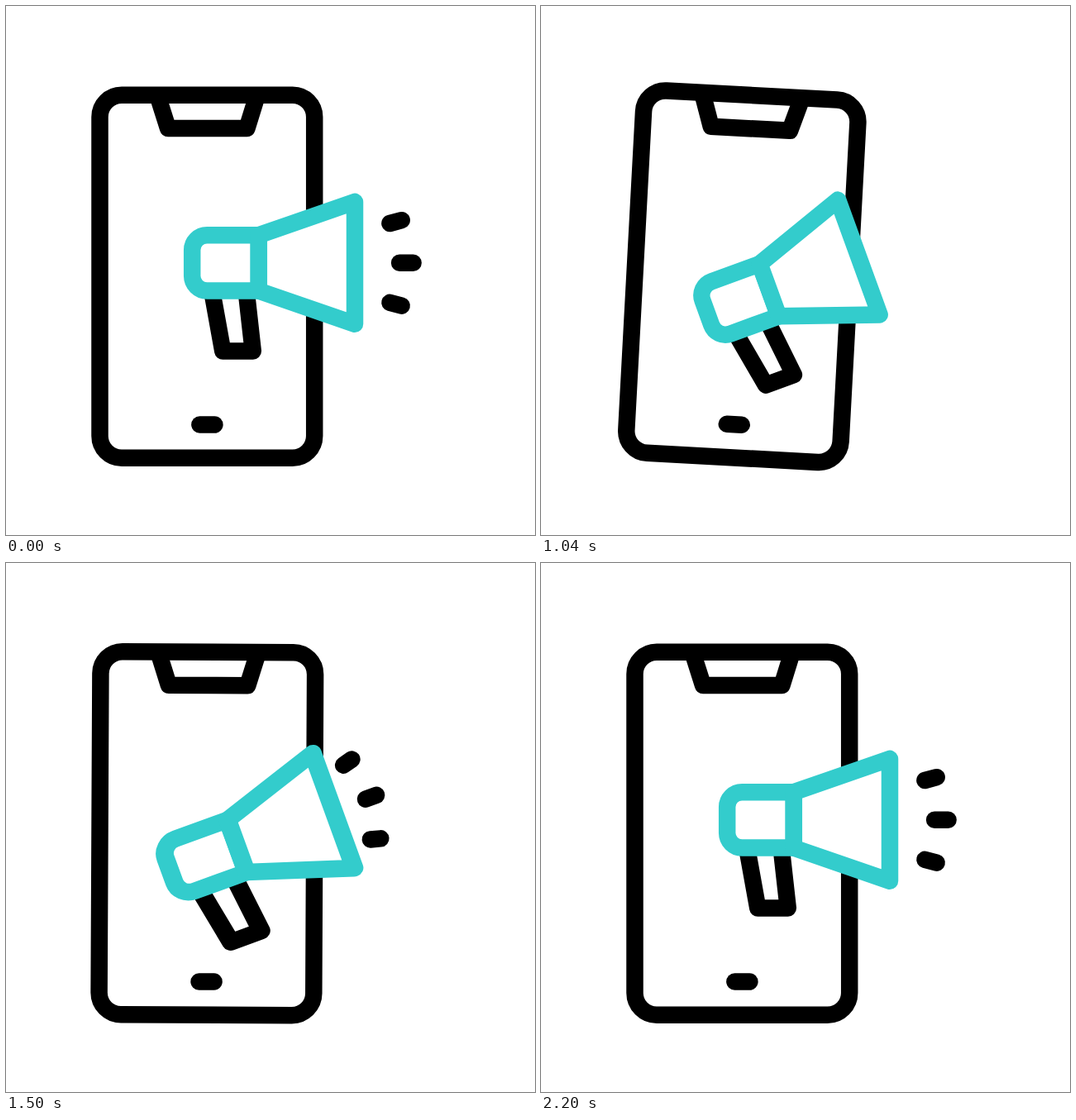
Write an HTML page that moves like this. It is 640 px wide and 640 px high and loops after 2420 ms.

```html
<!DOCTYPE html>
<html lang="en">
<head>
<meta charset="utf-8">
<title>Mobile megaphone</title>
<style>
  html, body { margin: 0; width: 100%; height: 100%; overflow: hidden; background: #fff; }
  svg { display: block; width: 100vw; height: 100vh; }
  svg * { stroke-linejoin: round; }
  g { fill: none; stroke: #000; stroke-width: 20.5; }
  .round { stroke-linecap: round; }
  .horn { stroke: #3cc; fill: #fff; }
</style>
</head>
<body>
<svg viewBox="0 0 640 640">
  <g id="phone">
    <rect x="113.5" y="107.7" width="259.7" height="439" rx="26.5"/>
    <path d="M183.3 108 L196 148 H291.5 L303.9 108"/>
    <path class="round" d="M234.4 506.5 H252.4"/>
  </g>
  <g id="megaphone">
    <path d="M249.2 345 L262.3 417.6 H298.8 L290.7 345" fill="#fff"/>
    <path class="horn" d="M305.8 277.3 H243.2 A18 18 0 0 0 225.2 295.3 V326.6 A18 18 0 0 0 243.2 344.6 H305.8 Z"/>
    <path class="horn" d="M305.8 277.3 L422 236.9 V384.7 L305.8 344.6 Z"/>
  </g>
  <g id="sparks" class="round"></g>
</svg>
<script>
  const LOOP = 2420;
  const PIVOT = '383.7 412';
  const byId = id => document.getElementById(id);
  const phone = byId('phone'), megaphone = byId('megaphone'), sparks = byId('sparks');

  // Each track lists [time, value] pairs, eased in and out between them.
  const tilt = [[400, 0], [1000, -20], [1785, -20], [2200, 0]];
  const stretch = [[1000, 1], [1280, 0.885], [1500, 1.07], [1800, 0.962], [2200, 1]];
  const lunge = [[1300, 0], [1500, 5], [1800, 5], [2200, 0]];
  const grow = [[1200, 0], [1600, 1]];
  const burst = [[0, 1], [200, 1.135], [201, 1]];

  // The phone swings from side to side in nine equal parts.
  const SWINGS = 9;
  const shake = Array.from({ length: SWINGS + 1 }, (_, i) => {
    const still = i === 0 || i === SWINGS;
    return [1000 + i * 1000 / SWINGS, still ? 0 : i % 2 ? 10 : -10];
  });

  const rays = [
    { x: 464.4, y: 263, angle: -15, length: 14.8, pull: 3.3 },
    { x: 476.1, y: 310.8, angle: 0, length: 16.5, pull: 6.4 },
    { x: 464.4, y: 358.8, angle: 15, length: 14.8, pull: 3.3 }
  ].map(ray => {
    const line = document.createElementNS('http://www.w3.org/2000/svg', 'line');
    line.setAttribute('transform', `translate(${ray.x} ${ray.y}) rotate(${ray.angle})`);
    sparks.append(line);
    return { ...ray, line };
  });

  const clamp = v => Math.min(1, Math.max(0, v));
  const ease = v => v * v * (3 - 2 * v);

  function at(track, t) {
    if (t <= track[0][0]) return track[0][1];
    for (let i = 1; i < track.length; i++) {
      const [t0, a] = track[i - 1], [t1, b] = track[i];
      if (t < t1) return a + (b - a) * ease((t - t0) / (t1 - t0));
    }
    return track[track.length - 1][1];
  }

  function draw(t) {
    const turn = `rotate(${at(tilt, t)} ${PIVOT})`;
    phone.setAttribute('transform', `rotate(${at(shake, t)} 243.35 327.2)`);
    megaphone.setAttribute('transform',
      `${turn} translate(${323.7 + at(lunge, t)} 0) scale(${at(stretch, t)} 1) translate(-323.7 0)`);

    const leaving = t < 600;
    const size = at(burst, t);
    sparks.setAttribute('transform',
      `${turn} translate(434 324) scale(${size}) translate(-434 -324)`);
    sparks.setAttribute('opacity', leaving ? clamp(1 - t / 200) : clamp((t - 1200) / 200));

    const grown = leaving ? 1 : at(grow, t);
    for (const { line, length, pull } of rays) {
      const start = -pull * (1 - grown);
      line.setAttribute('x1', start);
      line.setAttribute('x2', start + length * grown + 0.01);
    }
  }

  const begin = performance.now();
  function tick() {
    draw((performance.now() - begin) % LOOP);
    requestAnimationFrame(tick);
  }
  tick();
</script>
</body>
</html>
```
